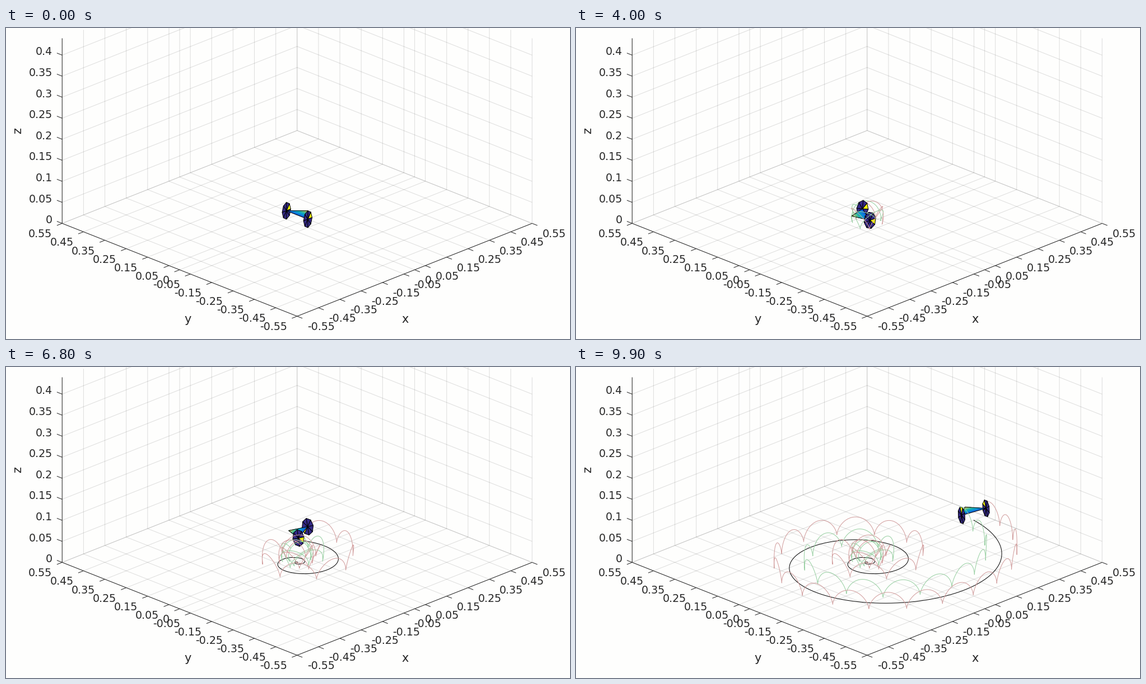
Recreate the animation shown at these times as a matplotlib script. Size 1007 by 556 pixels, loop 10000 ms.

```python
import numpy as np
import matplotlib.pyplot as plt
from matplotlib.animation import FuncAnimation
from matplotlib.collections import LineCollection, PolyCollection
from matplotlib.colors import LinearSegmentedColormap

W, H, DPI = 1007, 556, 64
PT = 72 / DPI                      # points per pixel
FRAMES, INTERVAL = 100, 100

# Oblique view of the floor and its walls, in pixels per unit
CX, CY = 519.8, 349.3
KX, KY, KZ = 381.4, 150.9, 752.0
LIM, TOP = 0.55, 0.44
DARK = "#262626"

# Robot and spiral
WHEEL_R, HALF_AXLE, NOSE = 0.02, 0.05, 0.05
SECTORS, STRIPS = 8, 26
TURN_END, R_END = 8 * np.pi, 0.4993
BLUE, YELLOW = "#352a87", "#f9fb0e"
PARULA = LinearSegmentedColormap.from_list("parula", [
    (0, "#352a87"), (0.14, "#0f5cdd"), (0.25, "#127dd8"), (0.37, "#079ccf"),
    (0.5, "#15b1b4"), (0.62, "#59bd8c"), (0.75, "#a5be6b"), (0.87, "#e1b952"),
    (1, "#f9fb0e")])


def project(p):
    p = np.asarray(p, float)
    x, y, z = p[..., 0], p[..., 1], p[..., 2]
    return np.stack([CX + (x - y) * KX, CY - (x + y) * KY - z * KZ], -1)


def nearness(p):
    p = np.asarray(p, float)
    return -350 * (p[..., 0] + p[..., 1]) + 324 * p[..., 2]


# ---------- path, worked out once over the whole spiral ----------
turn = np.linspace(1e-6, TURN_END, 7000)
radius = R_END * (turn / TURN_END) ** 4
heading = turn + np.arctan(turn / 4)
zero = np.zeros_like(turn)
center = np.stack([radius * np.cos(turn), radius * np.sin(turn), zero], -1)
speed = radius * np.sqrt(1 + 16 / turn ** 2)
length = np.concatenate([[0], np.cumsum((speed[1:] + speed[:-1]) / 2 * np.diff(turn))])

forward = np.stack([np.cos(heading), np.sin(heading), zero], -1)
right = np.stack([np.sin(heading), -np.cos(heading), zero], -1)
UP = np.array([0, 0, 1.0])


def wheel_track(side):
    """Hub positions and rolled angle; side is +1 for right, -1 for left."""
    hub = center + side * HALF_AXLE * right + WHEEL_R * UP
    return hub, (length + side * HALF_AXLE * heading) / WHEEL_R


def rim(hub, fwd, angle):
    angle = np.asarray(angle)[..., None]
    return hub + WHEEL_R * (np.cos(angle) * fwd + np.sin(angle) * UP)


hub_l, roll_l = wheel_track(-1)
hub_r, roll_r = wheel_track(1)
trails = [(center, "#000000"),
          (rim(hub_l, forward, -roll_l), "#97cfa1"),
          (rim(hub_r, forward, -roll_r), "#d19c9c")]
trails = [(project(p), nearness(p), c) for p, c in trails]

# Progress along the spiral: slow start, fast middle, slow stop
KEY_T = np.array([0, 14, 40, 56, 68, 77, 84, 88, 99.0])
KEY_S = np.array([0, 0.0296, 0.31, 0.581, 0.777, 0.893, 0.9567, 0.975, 1])
KEY_V = np.gradient(KEY_S, KEY_T)
KEY_V[[0, -1]] = 0


def progress(t):
    i = min(np.searchsorted(KEY_T, t, "right") - 1, len(KEY_T) - 2)
    h = KEY_T[i + 1] - KEY_T[i]
    u = (t - KEY_T[i]) / h
    ease = u * u * (3 - 2 * u)
    return (KEY_S[i] * (1 - ease) + KEY_S[i + 1] * ease
            + h * u * (1 - u) * (KEY_V[i] * (1 - u) - KEY_V[i + 1] * u))


# ---------- stage ----------
fig = plt.figure(figsize=(W / DPI, H / DPI), dpi=DPI, facecolor="#fefefd")
ax = fig.add_axes([0, 0, 1, 1])
ax.set_xlim(0, W)
ax.set_ylim(H, 0)
ax.axis("off")


def add_lines(segments, zorder, **style):
    ax.add_collection(LineCollection(segments, linewidths=PT, zorder=zorder,
                                     snap=False, **style))


def label(x, y, text, ha):
    ax.text(x, y + 6.9, text, ha=ha, va="baseline", color=DARK,
            family="DejaVu Sans", fontsize=19 * PT, zorder=3)


def draw_axes():
    ticks = [-0.55, -0.45, -0.35, -0.25, -0.15, -0.05, 0,
             0.05, 0.15, 0.25, 0.35, 0.45, 0.55]
    levels = np.arange(9) * 0.05
    grid = []
    for v in ticks:
        grid += [[(v, -LIM, 0), (v, LIM, 0)], [(-LIM, v, 0), (LIM, v, 0)],
                 [(v, LIM, 0), (v, LIM, TOP)], [(LIM, v, 0), (LIM, v, TOP)]]
    for z in levels:
        grid += [[(-LIM, LIM, z), (LIM, LIM, z)], [(LIM, -LIM, z), (LIM, LIM, z)]]
    add_lines(project(grid), 0, colors=DARK, alpha=0.15)

    left, front, side = (-LIM, LIM, 0), (-LIM, -LIM, 0), (LIM, -LIM, 0)
    marks = [project([left, (-LIM, LIM, TOP)]), project([left, front]),
             project([front, side])]
    dx, dy = 9.4, 3.7
    for v in ticks:
        x, y = project((-LIM, v, 0))
        marks.append([(x, y), (x - dx, y + dy)])
        label(x - 18, y + 18.2, f"{v:g}", "right")
        x, y = project((v, -LIM, 0))
        marks.append([(x, y), (x + dx, y + dy)])
        label(x + 18, y + 18.2, f"{v:g}", "left")
    for z in levels:
        x, y = project((-LIM, LIM, z))
        marks.append([(x, y), (x - dx, y - dy)])
        label(x - 17, y - 7, f"{z:g}", "right")
    add_lines(marks, 1, colors=DARK)

    for x, y, name, turned in ((712.8, 521, "x", 0), (325, 521, "y", 0),
                               (21.5, 183.3, "z", 90)):
        ax.text(x, y, name, ha="center", va="center", rotation=turned, color=DARK,
                family="DejaVu Sans", fontsize=21 * PT, zorder=3)


draw_axes()

far, near = [], []
for store, order in ((far, 2), (near, 6)):
    for _, _, color in trails:
        store.append(ax.plot([], [], color=color, lw=PT, zorder=order)[0])
robot = PolyCollection([], linewidths=PT, zorder=4)
ax.add_collection(robot)


def wheel_faces(hub, fwd, roll):
    angles = np.arange(SECTORS + 1) * 2 * np.pi / SECTORS - roll
    pts, mid = project(rim(hub, fwd, angles)), project(hub)
    return [(np.array([mid, pts[k], pts[k + 1]]), YELLOW if k == 0 else BLUE, "black")
            for k in range(SECTORS)]


def body_faces(a, b, tip):
    """Shrinking triangles stacked towards the tip give a seamless gradient."""
    a, b, tip = project(a), project(b), project(tip)
    faces = []
    for u in np.arange(STRIPS) / STRIPS:
        tri = np.array([a + (tip - a) * u, b + (tip - b) * u, tip])
        faces.append((tri, PARULA(0.13 + 0.75 * u), "none"))
    faces.append((np.array([a, b, tip]), "none", "black"))
    return faces


def update(frame):
    i = int(round(progress(frame) * (len(turn) - 1)))
    fwd, a, b = forward[i], hub_l[i], hub_r[i]
    mid = (a + b) / 2
    tip = mid + NOSE * fwd
    parts = [(nearness(a), wheel_faces(a, fwd, roll_l[i])),
             (nearness(b), wheel_faces(b, fwd, roll_r[i])),
             (nearness((a + b + tip) / 3), body_faces(a, b, tip))]
    parts.sort(key=lambda part: part[0])
    faces = [face for _, group in parts for face in group]
    robot.set_verts([f[0] for f in faces])
    robot.set_facecolor([f[1] for f in faces])
    robot.set_edgecolor([f[2] for f in faces])

    limit = nearness(mid)
    for (pts, depth, _), back, front in zip(trails, far, near):
        pts = pts[:i + 1]
        ahead = depth[:i + 1] > limit
        back.set_data(pts[:, 0], np.where(ahead, np.nan, pts[:, 1]))
        front.set_data(pts[:, 0], np.where(ahead, pts[:, 1], np.nan))
    return [robot, *far, *near]


anim = FuncAnimation(fig, update, frames=FRAMES, interval=INTERVAL,
                     init_func=lambda: update(0), repeat=True, repeat_delay=0)
plt.show()
```
